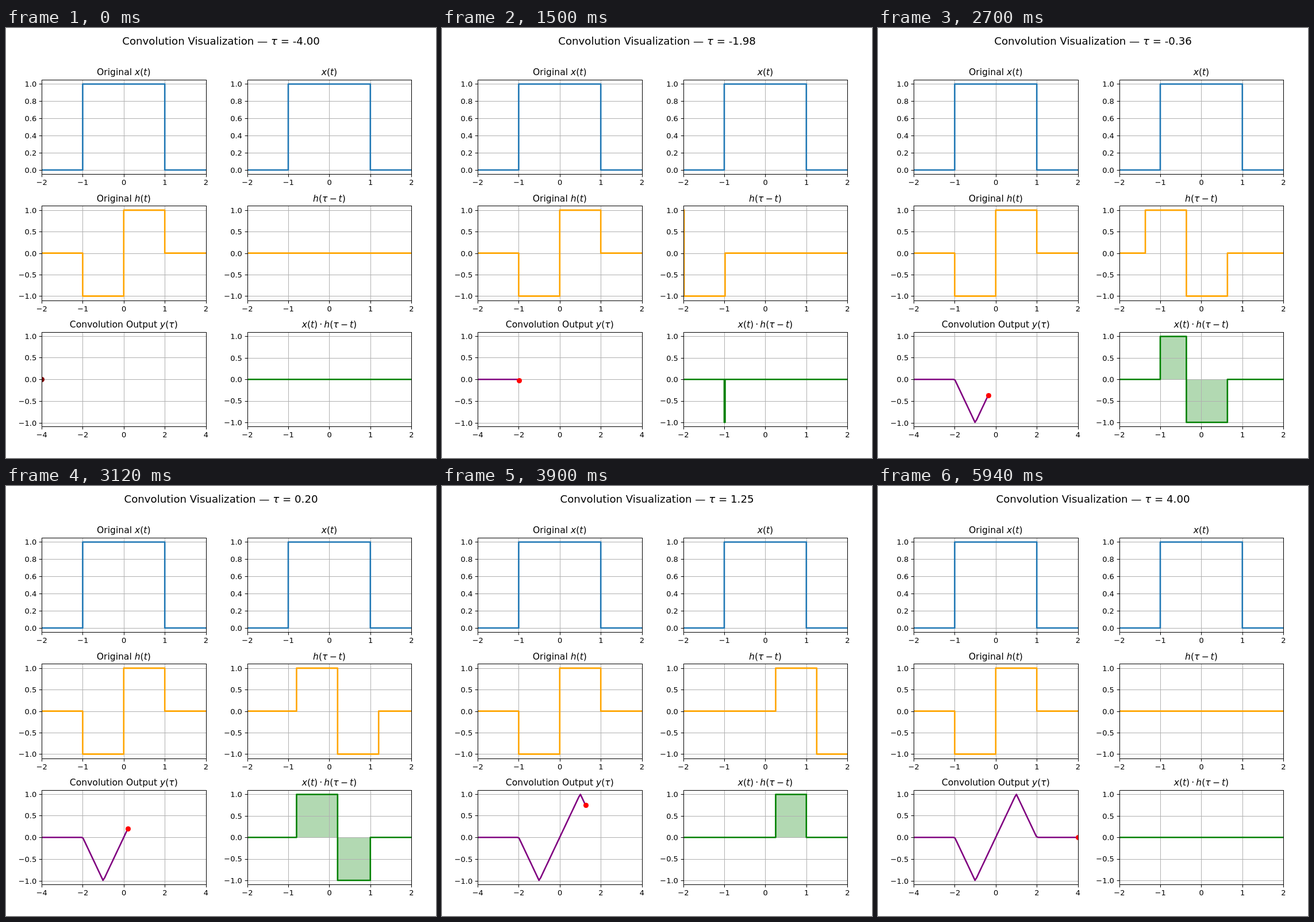
An HTML page that plays this animation: 748x748 px, repeating every 6000 ms.

```html
<!DOCTYPE html>
<html lang="en">
<head>
<meta charset="utf-8">
<title>Convolution Visualization</title>
<style>
  html, body { margin: 0; width: 100%; height: 100%; overflow: hidden; background: #fff; }
  svg { display: block; width: 100vw; height: 100vh; }
  text { font-family: "DejaVu Sans", sans-serif; white-space: pre; }
  .tick { font-size: 12.99px; }
  .title { font-size: 15.58px; text-anchor: middle; }
  .head { font-size: 18.18px; text-anchor: middle; }
  .it { font-style: italic; }
  .curve { fill: none; stroke-width: 2.6; stroke-linejoin: round; }
</style>
</head>
<body>
<svg id="stage" viewBox="0 0 748 748"></svg>
<script>
const NS = 'http://www.w3.org/2000/svg';
const stage = document.getElementById('stage');
const STEPS = 100, STEP_MS = 60;
const W = 285.6, H = 164.4;
const COLS = [62, 419.6], ROWS = [90, 309.45, 529];

function add(parent, tag, attrs = {}, text) {
  const el = document.createElementNS(NS, tag);
  for (const key in attrs) el.setAttribute(key, attrs[key]);
  if (text !== undefined) el.textContent = text;
  parent.appendChild(el);
  return el;
}

const snap = v => Math.floor(v + 0.5) + 0.5;
const minus = s => s.replace('-', '\u2212');

// Title markup: *x* is italic, ~ is a thin gap before the next sign
function setTitle(el, src) {
  el.textContent = '';
  for (const part of src.match(/\*[^*]+\*|~.|[^*~]+/g)) {
    if (part[0] === '*') add(el, 'tspan', { class: 'it' }, part.slice(1, -1));
    else if (part[0] === '~') add(el, 'tspan', { dx: 3.1 }, part[1]);
    else add(el, 'tspan', {}, part);
  }
  for (const s of el.querySelectorAll('tspan[dx]'))
    if (s.nextSibling) s.nextSibling.setAttribute('dx', 3.1);
}

function makeAxes(col, row, title, xMax, xStep, yLow, yHigh, yTicks) {
  const left = COLS[col], top = ROWS[row], right = left + W, bottom = top + H;
  const px = x => left + (x + xMax) / (2 * xMax) * W;
  const py = y => bottom - (y - yLow) / (yHigh - yLow) * H;
  const x0 = snap(left), x1 = snap(right), y0 = snap(top), y1 = snap(bottom);
  const id = `clip${col}${row}`;
  const box = { x: x0, y: y0, width: x1 - x0, height: y1 - y0 };
  add(add(stage, 'clipPath', { id }), 'rect', box);

  const under = add(stage, 'g', { 'clip-path': `url(#${id})` });
  const grid = add(stage, 'g', { stroke: '#b0b0b0', 'stroke-width': 1 });
  const over = add(stage, 'g', { 'clip-path': `url(#${id})` });
  const frame = add(stage, 'g', { stroke: '#000', 'stroke-width': 1, fill: 'none' });
  const labels = add(stage, 'g');

  for (let x = -xMax; x <= xMax; x += xStep) {
    const gx = snap(px(x));
    add(grid, 'path', { d: `M${gx} ${y0}V${y1}` });
    add(frame, 'path', { d: `M${gx} ${y1}v4.8` });
    add(labels, 'text', { class: 'tick', x: px(x) + 0.3, y: bottom + 19, 'text-anchor': 'middle' }, minus(String(x)));
  }
  for (const y of yTicks) {
    const gy = snap(py(y));
    add(grid, 'path', { d: `M${x0} ${gy}H${x1}` });
    add(frame, 'path', { d: `M${x0} ${gy}h-4.8` });
    add(labels, 'text', { class: 'tick', x: left - 8.8, y: py(y) + 4.9, 'text-anchor': 'end' }, minus(y.toFixed(1)));
  }
  add(frame, 'rect', box);
  setTitle(add(labels, 'text', { class: 'title', x: left + W / 2, y: top - 7.7 }), title);

  const curve = color => add(over, 'path', { class: 'curve', stroke: color, 'stroke-linecap': 'square' });
  return { px, py, under, over, curve };
}

const pulse = t => Math.abs(t) < 1 ? 1 : 0;
const kernel = t => Math.abs(t) < 1 ? Math.sign(t) : 0;

// Integral of pulse(t) * kernel(tau - t)
function output(tau) {
  const a = Math.abs(tau);
  return Math.sign(tau) * (a <= 1 ? a : Math.max(0, 2 - a));
}

// Path of a piecewise constant function on [-2, 2]
function stepPath(ax, f, breaks) {
  const edges = [-2, ...breaks.filter(b => b > -2 && b < 2).sort((a, b) => a - b), 2];
  let d = '';
  for (let i = 1; i < edges.length; i++) {
    const a = edges[i - 1], b = edges[i];
    if (b - a < 1e-9) continue;
    const y = ax.py(f((a + b) / 2)).toFixed(2);
    d += (d ? `V${y}` : `M${ax.px(a)} ${y}`) + `H${ax.px(b).toFixed(2)}`;
  }
  return d;
}

const fifths = [0, 0.2, 0.4, 0.6, 0.8, 1], halves = [-1, -0.5, 0, 0.5, 1];
const BLUE = '#1f77b4', ORANGE = '#ffa500';

const head = add(stage, 'text', { class: 'head', x: 374, y: 29 });
const axX = makeAxes(0, 0, 'Original *x*(*t*)', 2, 1, -0.05, 1.05, fifths);
const axX2 = makeAxes(1, 0, '*x*(*t*)', 2, 1, -0.05, 1.05, fifths);
const axH = makeAxes(0, 1, 'Original *h*(*t*)', 2, 1, -1.1, 1.1, halves);
const axFlip = makeAxes(1, 1, '*h*(*τ*~\u2212*t*)', 2, 1, -1.1, 1.1, halves);
const axOut = makeAxes(0, 2, 'Convolution Output *y*(*τ*)', 4, 2, -1.089, 1.089, halves);
const axProd = makeAxes(1, 2, '*x*(*t*)~·*h*(*τ*~\u2212*t*)', 2, 1, -1.1, 1.1, halves);

for (const ax of [axX, axX2]) ax.curve(BLUE).setAttribute('d', stepPath(ax, pulse, [-1, 1]));
axH.curve(ORANGE).setAttribute('d', stepPath(axH, kernel, [-1, 0, 1]));

const flipLine = axFlip.curve(ORANGE);
const area = add(axProd.under, 'path', { fill: '#008000', 'fill-opacity': 0.3 });
const prodLine = axProd.curve('#008000');
const outLine = axOut.curve('#800080');
const dot = add(axOut.over, 'circle', { r: 4.55 });

const tauAt = k => -4 + 8 * k / (STEPS - 1);

function draw(ms) {
  const k = Math.floor(ms / STEP_MS) % STEPS;
  const tau = tauAt(k);
  const flipped = t => kernel(tau - t);
  const edges = [tau - 1, tau, tau + 1];

  setTitle(head, `Convolution Visualization — *τ* = ${tau.toFixed(2)}`);
  flipLine.setAttribute('d', stepPath(axFlip, flipped, edges));

  const prod = stepPath(axProd, t => pulse(t) * flipped(t), [-1, 1, ...edges]);
  prodLine.setAttribute('d', prod);
  area.setAttribute('d', `${prod}V${axProd.py(0)}H${axProd.px(-2)}Z`);

  const pts = [];
  for (let i = 0; i <= k; i++) {
    const t = tauAt(i);
    pts.push(`${axOut.px(t).toFixed(2)} ${axOut.py(output(t)).toFixed(2)}`);
  }
  outLine.setAttribute('d', k ? 'M' + pts.join('L') : '');

  dot.setAttribute('cx', snap(axOut.px(tau)));
  dot.setAttribute('cy', snap(axOut.py(output(tau))));
  dot.setAttribute('fill', k ? '#ff0000' : '#800000');
}

function tick() {
  draw(performance.now());
  requestAnimationFrame(tick);
}
tick();
</script>
</body>
</html>
```
